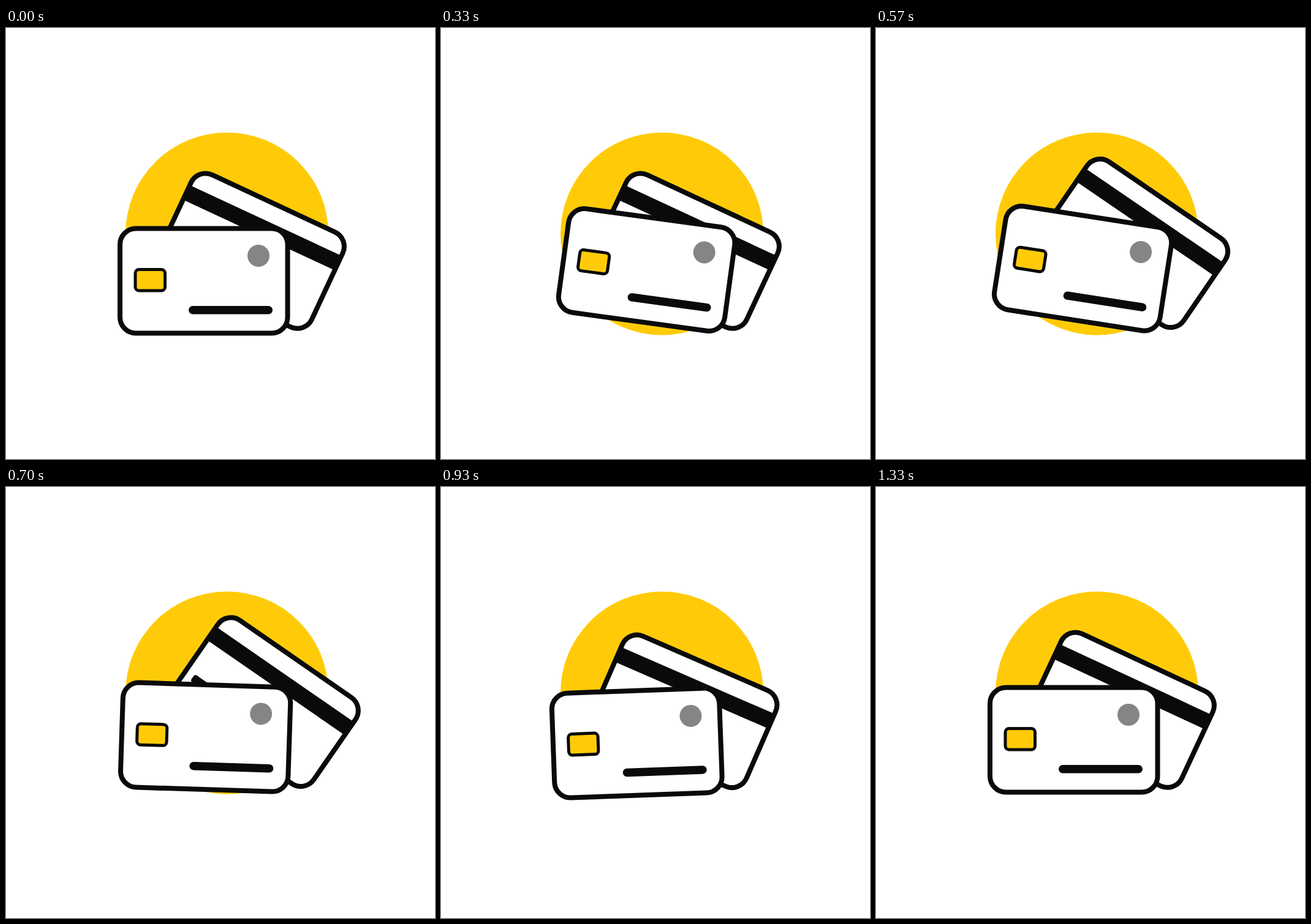
An HTML page that plays this animation: 700 by 704 pixels, repeating every 2.01 s.

```html
<!DOCTYPE html>
<html lang="en">
<head>
<meta charset="utf-8">
<title>Bank cards</title>
<style>
  html, body { margin: 0; width: 100%; height: 100%; overflow: hidden; background: #fff; }
  svg { display: block; width: 100%; height: 100%; }
  .edge { fill: #fff; stroke: #0a0a0a; stroke-width: 8; }
  .ink { fill: #0a0a0a; }
  .sun { fill: #ffcb08; }
  .chip { fill: #ffcb08; stroke: #0a0a0a; stroke-width: 5; }
  .badge { fill: #858585; }
</style>
</head>
<body>
<svg viewBox="0 0 700 704">
  <circle class="sun" cx="360.5" cy="336.2" r="165.5"/>
  <g id="back">
    <g transform="translate(311 223.6) rotate(25)">
      <rect class="edge" x="4" y="4" width="273" height="171" rx="26"/>
      <rect class="ink" x="4" y="34.6" width="273" height="26.2"/>
      <rect class="ink" x="19.5" y="118" width="137" height="13.5" rx="4"/>
    </g>
  </g>
  <g id="front">
    <rect class="edge" x="186" y="327.5" width="273.5" height="171" rx="26"/>
    <rect class="chip" x="211" y="394.5" width="48.5" height="34.5" rx="6"/>
    <rect class="ink" x="298" y="454" width="137" height="13.5" rx="6.75"/>
    <circle class="badge" cx="412" cy="372" r="18"/>
  </g>
</svg>
<script>
const LOOP = 2010;
const STEP = 100 / 3;

const sine = x => (1 - Math.cos(Math.PI * x)) / 2;

// cubic-bezier(.4, 0, .2, 1), solved by bisection
function swift(x) {
  const curve = (a, b, s) => 3 * a * s * (1 - s) ** 2 + 3 * b * s * s * (1 - s) + s ** 3;
  let lo = 0, hi = 1;
  for (let i = 0; i < 24; i++) {
    const mid = (lo + hi) / 2;
    if (curve(0.4, 0.2, mid) < x) lo = mid; else hi = mid;
  }
  return curve(0, 1, lo);
}

// Swing of a card: [start, end, from angle, to angle, easing]
const swing = [
  [0, 333, 0, 10, swift],
  [333, 677, 10, -3, sine],
  [677, 1000, -3, 0, swift]
];

function angleAt(t) {
  const part = swing.find(([start, end]) => t >= start && t < end);
  if (!part) return 0;
  const [start, end, from, to, ease] = part;
  return from + (to - from) * ease((t - start) / (end - start));
}

const cards = [
  { el: document.getElementById("front"), delay: 5 * STEP, pivot: "461.5 499" },
  { el: document.getElementById("back"), delay: 10 * STEP, pivot: "488.3 496" }
];

function draw(now) {
  const t = Math.floor(((now % LOOP) + 4) / STEP) * STEP;
  for (const { el, delay, pivot } of cards) {
    el.setAttribute("transform", `rotate(${angleAt(t - delay).toFixed(3)} ${pivot})`);
  }
}

let origin;
function tick(now) {
  origin ??= now;
  draw(now - origin);
  requestAnimationFrame(tick);
}
draw(0);
requestAnimationFrame(tick);
</script>
</body>
</html>
```
